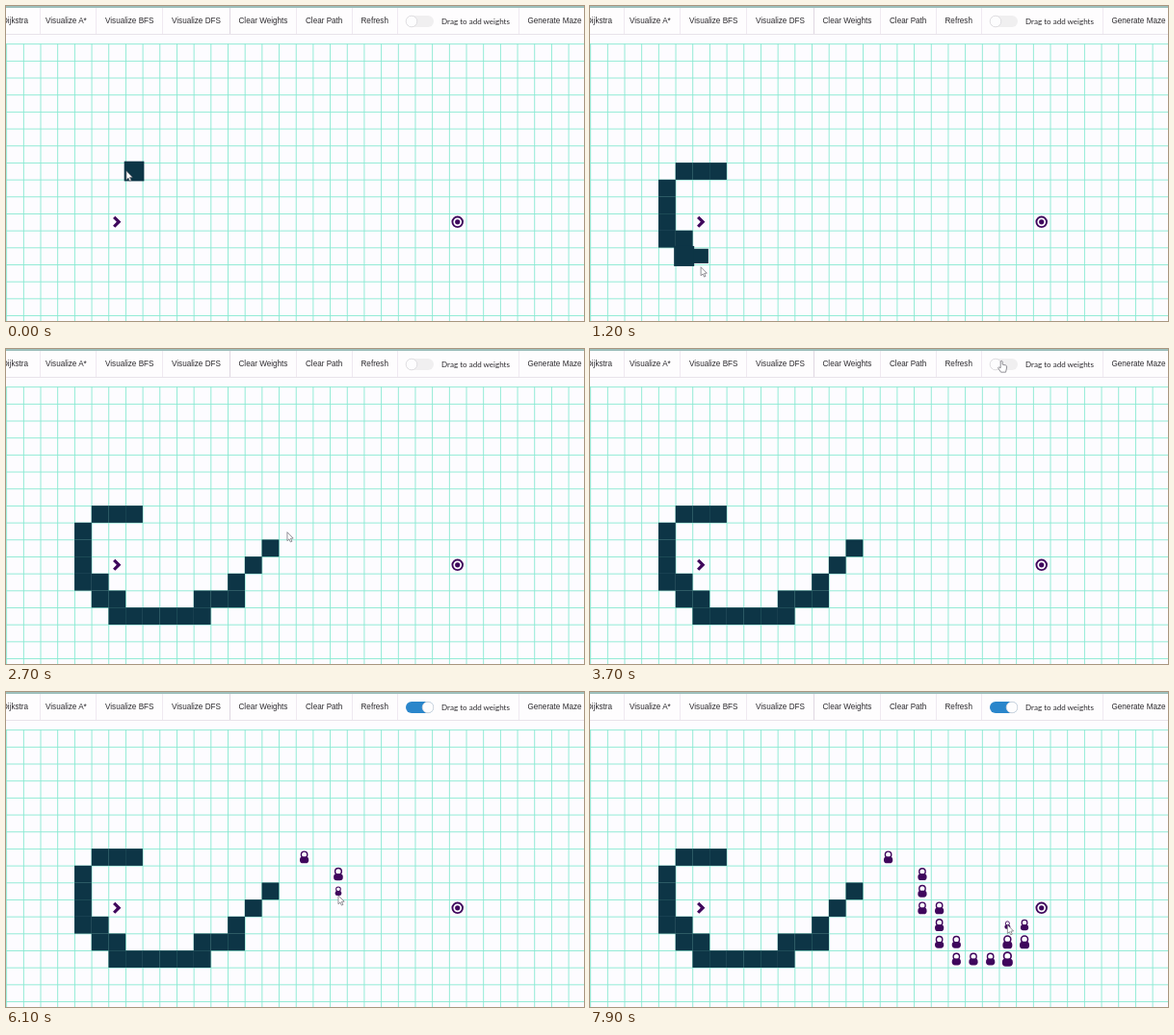
Write an HTML page with a canvas that moves like this. It is 600 px wide and 328 px high and loops after 8 s.

```html
<!DOCTYPE html>
<html lang="en">
<head>
<meta charset="utf-8">
<title>Pathfinding visualizer</title>
<style>
html, body { margin: 0; width: 100%; height: 100%; overflow: hidden; background: #fdfcff; }
#stage { position: relative; width: 600px; height: 328px; overflow: hidden; }
nav { position: absolute; inset: 0 0 auto 0; height: 30px; box-sizing: border-box;
  background: #fefdfe; border-top: 2px solid #9dbfbc; border-bottom: 1px solid #e8e3ea; }
nav span { position: absolute; top: 8.7px; white-space: nowrap; color: #2c2a2e;
  font: 8.14px/10px "Liberation Sans", Arial, sans-serif; }
nav span.label { font-family: Lato, sans-serif; font-size: 8.06px; top: 8.5px; }
nav i { position: absolute; top: 0; bottom: 0; width: 1px; background: #efe9f1; }
nav i.strong { background: #dfd8e2; }
canvas { position: absolute; left: 0; top: 0; }
</style>
</head>
<body>
<div id="stage">
  <nav>
    <span style="right:577px">Visualize Dijkstra</span>
    <span style="left:41px">Visualize A*</span>
    <span style="left:103px">Visualize BFS</span>
    <span style="left:172px">Visualize DFS</span>
    <span style="left:241.5px">Clear Weights</span>
    <span style="left:311px">Clear Path</span>
    <span style="left:368.5px">Refresh</span>
    <span class="label" style="left:452px">Drag to add weights</span>
    <span style="left:541.5px">Generate Maze</span>
    <i style="left:35px"></i><i style="left:93px"></i><i style="left:162px"></i>
    <i class="strong" style="left:232px"></i><i style="left:301px"></i>
    <i style="left:359px"></i><i style="left:406px"></i><i style="left:532px"></i>
  </nav>
  <canvas id="view" width="600" height="328"></canvas>
</div>
<script>
const ctx = document.getElementById('view').getContext('2d');
const LOOP = 8000, STEP = 100, POP = 300, TOGGLE_AT = 4100;
const CELL = 17.68, TOP = 39, SHIFT = 0.2;
const PURPLE = '#3f065c', WALL = '#0d3546', GRID = '#88e9d2';

// Each stroke walks the grid by compass moves, speeding up on the way.
const strokes = [
  { draw: drawWall, from: -120, to: 1143, col: 7, row: 7, moves: 'W W SW S S S E S E' },
  { draw: drawWall, from: 1230, to: 1950, col: 6, row: 13, moves: 'E E E E E N E E N' },
  { draw: drawWall, from: 2150, to: 2250, col: 14, row: 10, moves: 'NE' },
  { draw: drawWeight, from: 5577, to: 7165, col: 17, row: 7, moves: 'EES S S E S S E S E E E' },
  { draw: drawWeight, from: 7700, to: 7868, col: 25, row: 12, moves: 'SW N NE W' }
];

function walk({ draw, from, to, col, row, moves }) {
  const list = moves.split(' ');
  const cells = [{ draw, col, row, at: from }];
  list.forEach((move, i) => {
    const count = c => move.split(c).length - 1;
    col += count('E') - count('W');
    row += count('S') - count('N');
    const at = from + (to - from) * ((i + 1) / list.length) ** 0.7;
    cells.push({ draw, col, row, at });
  });
  return cells;
}

const cells = strokes.flatMap(walk);
const stops = [
  ...cells,
  { at: 2650, col: 15.6, row: 8.6 },
  { at: 3650, col: 23.65, row: -2.03 },
  { at: 4700, col: 23.65, row: -2.03 }
].sort((a, b) => a.at - b.at);

const easeOut = p => 1 - (1 - p) * (1 - p);
const clamp = p => Math.max(0, Math.min(1, p));
const mix = (a, b, p) => a + (b - a) * p;
const cellX = col => (col + 0.5) * CELL + SHIFT;
const cellY = row => TOP + (row + 0.5) * CELL + SHIFT;

function popScale(age) {
  const p = clamp(age / POP);
  return p < 0.5 ? mix(0.3, 1.2, easeOut(p * 2)) : mix(1.2, 1, easeOut(p * 2 - 1));
}

function pointerAt(t) {
  const next = stops.findIndex(s => s.at > t);
  const b = stops.at(next), a = next > 0 ? stops[next - 1] : b;
  const p = a === b ? 0 : (t - a.at) / (b.at - a.at);
  return [cellX(mix(a.col, b.col, p)), cellY(mix(a.row, b.row, p))];
}

function inCell(col, row, scale, draw) {
  ctx.save();
  ctx.translate(cellX(col), cellY(row));
  ctx.scale(scale, scale);
  draw();
  ctx.restore();
}

function disc(x, y, r) {
  ctx.beginPath();
  ctx.arc(x, y, r, 0, Math.PI * 2);
}

function poly(points) {
  ctx.beginPath();
  points.forEach(([x, y]) => ctx.lineTo(x, y));
  ctx.closePath();
}

function drawGrid() {
  ctx.fillStyle = GRID;
  for (let x = SHIFT; x < 600; x += CELL) ctx.fillRect(x, TOP + SHIFT, 0.9, 300);
  for (let y = TOP + SHIFT; y < 328; y += CELL) ctx.fillRect(0, y, 600, 0.9);
}

function drawWall() {
  const s = CELL + 0.1;
  ctx.fillStyle = WALL;
  ctx.fillRect(0.2 - s / 2, 0.2 - s / 2, s, s);
}

function drawWeight() {
  ctx.fillStyle = ctx.strokeStyle = PURPLE;
  ctx.lineWidth = 1.4;
  disc(0, -2.5, 3.2);
  ctx.stroke();
  ctx.beginPath();
  ctx.roundRect(-4.6, -0.3, 9.2, 6.8, 3.1);
  ctx.fill();
}

function drawStart() {
  ctx.fillStyle = PURPLE;
  poly([[-4.1, -3.8], [-1.8, -6], [4.3, 0], [-1.8, 6], [-4.1, 3.8], [-0.3, 0]]);
  ctx.fill();
}

function drawGoal() {
  ctx.fillStyle = ctx.strokeStyle = PURPLE;
  ctx.lineWidth = 1.9;
  disc(0, 0, 5.3);
  ctx.stroke();
  disc(0, 0, 2.6);
  ctx.fill();
}

function drawToggle(t) {
  const p = easeOut(clamp((t - TOGGLE_AT) / 200));
  ctx.fillStyle = p > 0 ? '#2a86cb' : '#f0eff0';
  ctx.beginPath();
  ctx.roundRect(415, 10, 29, 12, 6);
  ctx.fill();
  ctx.fillStyle = '#fdfdfe';
  ctx.strokeStyle = '#dad9dc';
  ctx.lineWidth = 0.8;
  disc(421 + 17 * p, 16, 5.8);
  ctx.fill();
  ctx.stroke();
}

function drawArrow() {
  poly([[0, 0], [0, 9], [2, 7.2], [3.4, 10.3], [4.9, 9.6], [3.5, 6.6], [6.2, 6.4]]);
}

function drawHand() {
  ctx.beginPath();
  ctx.moveTo(-1, 7);
  ctx.lineTo(-1, 0.8);
  ctx.quadraticCurveTo(0, -0.7, 1, 0.8);
  ctx.lineTo(1, 4);
  ctx.lineTo(4.4, 4.8);
  ctx.quadraticCurveTo(5.6, 5.2, 5.5, 6.8);
  ctx.lineTo(4.4, 12);
  ctx.lineTo(-0.6, 12);
  ctx.lineTo(-3.6, 7.6);
  ctx.quadraticCurveTo(-3.2, 5.8, -1, 7.6);
  ctx.closePath();
}

function drawPointer(t) {
  const [x, y] = pointerAt(t);
  const hover = x > 414 && x < 524 && y > 8 && y < 23;
  ctx.save();
  ctx.translate(x, y);
  ctx.fillStyle = '#fff';
  ctx.strokeStyle = '#77757d';
  ctx.lineWidth = 0.8;
  ctx.lineJoin = 'round';
  (hover ? drawHand : drawArrow)();
  ctx.fill();
  ctx.stroke();
  ctx.restore();
}

// A cell entered again pops again.
function drawCells(t) {
  const latest = new Map();
  for (const cell of cells) {
    if (cell.at <= t) latest.set(cell.col + ',' + cell.row, cell);
  }
  for (const { col, row, at, draw } of latest.values()) {
    inCell(col, row, popScale(t - at), draw);
  }
}

function render(t) {
  ctx.clearRect(0, 0, 600, 328);
  drawGrid();
  drawCells(t);
  inCell(6, 10, 1, drawStart);
  inCell(26, 10, 1, drawGoal);
  drawToggle(t);
  drawPointer(t);
}

const begin = performance.now();
function tick() {
  const t = (performance.now() - begin) % LOOP;
  render(Math.floor(t / STEP) * STEP);
  requestAnimationFrame(tick);
}
tick();
</script>
</body>
</html>
```
